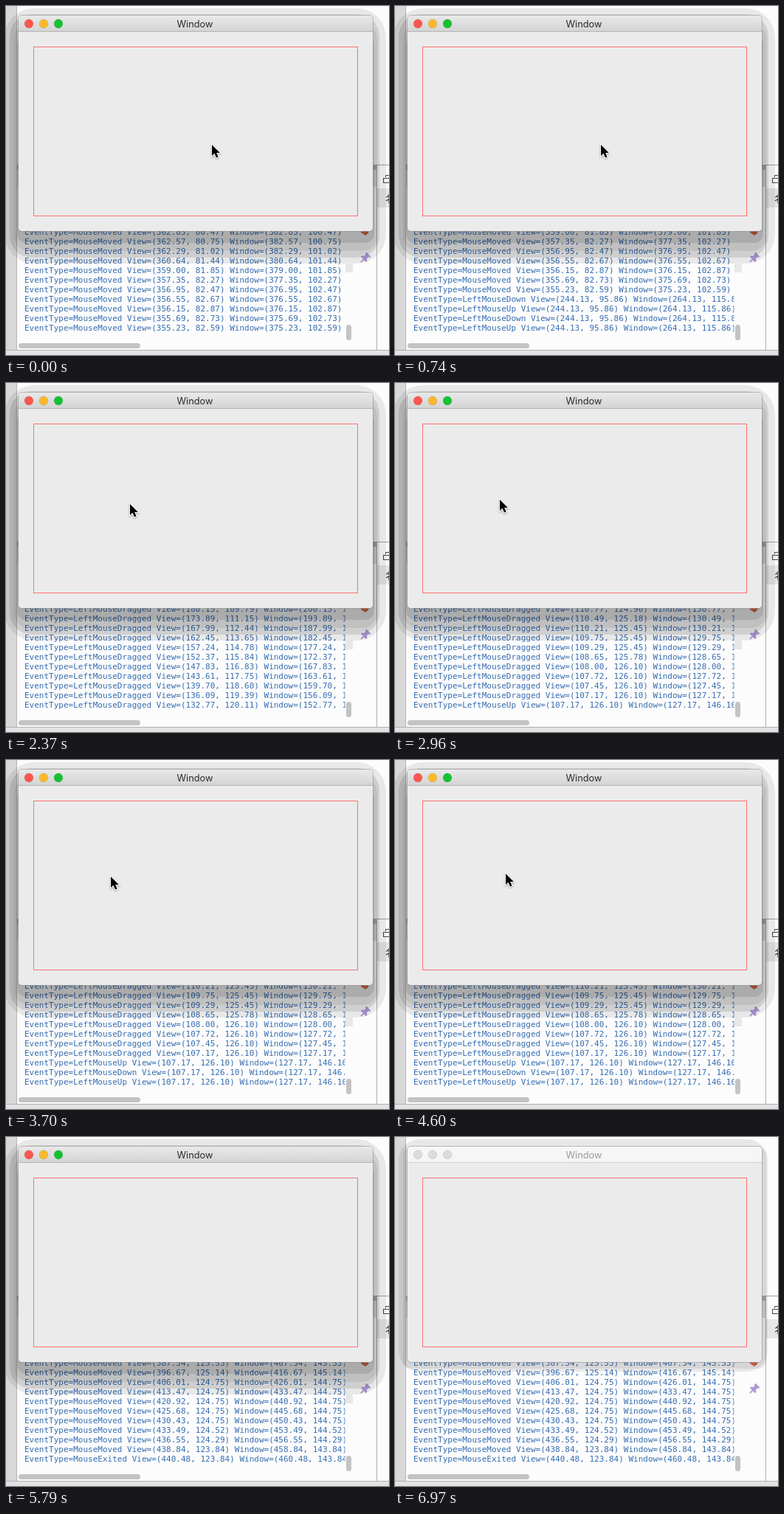
An HTML page for the animation above (7.07 s loop, 519 px wide and 473 px high).

```html
<!DOCTYPE html>
<html lang="en">
<head>
<meta charset="utf-8">
<title>Mouse events</title>
<style>
  html, body { margin: 0; width: 100%; height: 100%; overflow: hidden; background: #fcfcfc; }
  svg { display: block; }
  #log { font: 11px "DejaVu Sans Mono", monospace; fill: #366db1; }
  .title { font: 12.8px Inter, sans-serif; fill: #2b2b2b; text-anchor: middle; }
  .lights circle { stroke-width: .6; stroke: rgba(0, 0, 0, .18); }
  .lights :nth-child(1) { fill: #fc5650; }
  .lights :nth-child(2) { fill: #fdb92c; }
  .lights :nth-child(3) { fill: #14c231; }
  #arrow, #resize { stroke: #fff; paint-order: stroke; }
  #arrow { stroke-width: 2; filter: drop-shadow(0 1px 1px rgba(0, 0, 0, .35)); }
  .idle-shadow { display: none; }
  .idle .idle-shadow { display: inline; }
  .idle .active-shadow { display: none; }
  .idle .title { fill: #9a9a9a; }
  .idle .bar { fill: #f6f6f6; }
  .idle .rule { fill: #d3d3d3; }
  .idle .lights circle { fill: #dcdcdc; stroke: #c6c6c6; }
</style>
</head>
<body>
<svg id="stage" width="519" height="473" viewBox="0 0 519 473">
  <defs>
    <linearGradient id="barFill" x2="0" y2="1">
      <stop stop-color="#e9e9e9"/><stop offset="1" stop-color="#d3d3d3"/>
    </linearGradient>
    <clipPath id="logClip"><rect x="15" y="290" width="444.5" height="160"/></clipPath>
  </defs>

  <!-- editor behind the window -->
  <rect width="519" height="473" fill="#fcfcfc"/>
  <rect width="14" height="466" fill="#d8d8d8"/>
  <rect x="14" width="1" height="466" fill="#b5b5b5"/>
  <rect x="15" y="215" width="488" height="7" fill="#b0b0b0"/>
  <rect x="15" y="222" width="488" height="23" fill="#dedede"/>
  <rect x="502" y="215" width="1" height="251" fill="#b0b0b0"/>
  <rect x="503" y="215" width="16" height="1" fill="#a0a0a0"/>
  <rect x="503" y="247" width="16" height="26" fill="#e6e6e6"/>
  <g fill="none" stroke="#444">
    <rect x="511.5" y="233.5" width="10" height="6"/>
    <path d="M514.5 232V229.5H519"/>
  </g>
  <text x="514.5" y="266" font-size="12" font-family="Noto Sans CJK JP, Noto Sans CJK, sans-serif" fill="#222">名</text>
  <g id="log" clip-path="url(#logClip)"></g>
  <path d="M481 303H492L491 308L487 311L481 307Z" fill="#dd6b4c"/>
  <path transform="translate(486.5 341.5) rotate(45)" fill="#ab98d6"
        d="M-4-7H4V-4.5H2.5V-1L5 1V3H.8V8H-.8V3H-5V1L-2.5-1V-4.5H-4Z"/>
  <rect x="17" y="457" width="165" height="7" rx="3.5" fill="#c3c3c3"/>
  <rect x="461" y="432" width="7" height="21" rx="3.5" fill="#c3c3c3"/>
  <rect y="466" width="519" height="7" fill="#e3e3e3"/>
  <rect y="466" width="519" height="1" fill="#b0b0b0"/>

  <g class="active-shadow">
    <rect x="-2" y="3" width="517" height="346" rx="40" opacity=".08"/>
    <rect x="5" y="11" width="501" height="330" rx="30" opacity=".11"/>
    <rect x="11" y="24" width="492" height="308" rx="20" opacity=".07"/>
    <rect x="15" y="40" width="484" height="281" rx="12" opacity=".11"/>
    <rect x="460" y="349" width="10" height="12" opacity=".08"/>
  </g>
  <g class="idle-shadow">
    <rect x="5" y="3" width="500" height="315" rx="28" opacity=".08"/>
    <rect x="11" y="14" width="492" height="300" rx="10" opacity=".08"/>
  </g>

  <!-- window -->
  <rect x="16.5" y="12.5" width="481" height="293" rx="5" fill="#ebebeb" stroke="#000" stroke-opacity=".22"/>
  <path class="bar" d="M17 35V18Q17 13 22 13H492Q497 13 497 18V35Z" fill="url(#barFill)"/>
  <rect class="rule" x="17" y="34" width="480" height="1" fill="#b4b4b4"/>
  <g class="lights">
    <circle cx="31" cy="24" r="5.9"/><circle cx="51" cy="24" r="5.9"/><circle cx="71" cy="24" r="5.9"/>
  </g>
  <text class="title" x="256" y="28.6">Window</text>
  <rect x="37.5" y="55.5" width="439" height="229" fill="none" stroke="#ff7070"/>

  <path id="arrow" d="M0 0V15L3.5 11.8L6 17.6L8.6 16.5L6.2 10.9H11Z"/>
  <path id="resize" d="M487 165L491.5 160.8V164H498.5V160.8L503 165L498.5 169.2V166H491.5V169.2Z"/>
</svg>
<script>
const LOOP = 7070, IDLE_AT = 6970, EDGE_AT = 5640, CURSOR_GONE = 5790;
const ROWS = 11, TICKS = 8;
const byId = id => document.getElementById(id);

const log = [];    // printed events
const moves = [];  // pointer positions
const moveTo = (at, [x, y]) => moves.push({ at, x, y });

function emit(at, type, point) {
  log.push({ at, type, x: point[0], y: point[1] });
  moveTo(at, point);
}

// Points after `from` up to `to`, in n eased parts
const glide = (from, to, n, ease = p => p) => Array.from({ length: n }, (_, i) => {
  const p = ease((i + 1) / n);
  return from.map((v, axis) => v + (to[axis] - v) * p);
});

// Joins key points [x, y, parts] with straight glides
const route = (from, ...keys) => keys.flatMap(([x, y, n]) => {
  const points = glide(from, [x, y], n);
  from = [x, y];
  return points;
});

// Prints a stroke in equal bursts, from tick `first` to the last tick
function stroke(start, end, first, type, points, lastType, lastPoint) {
  const count = points.length + 1;
  const at = i => start + (end - start) * (first + Math.floor(i * (TICKS - first) / count)) / (TICKS - 1);
  points.forEach((point, i) => emit(at(i), type, point));
  emit(end, lastType, lastPoint);
}

function click(down, up, point) {
  emit(down, 'LeftMouseDown', point);
  emit(up, 'LeftMouseUp', point);
}

const ENTRY = [362.85, 80.47], PRESS = [244.13, 95.86], DROP = [107.17, 126.1];
const SLOWING = [110.77, 124.9], LEAVING = [387.34, 125.53], EXIT = [440.48, 123.84];

[ENTRY, ...route(ENTRY, [362.29, 81.02, 2], [357.35, 82.27, 3], [356.15, 82.87, 3], [355.23, 82.59, 2])]
  .forEach(point => emit(0, 'MouseMoved', point));
moveTo(0, PRESS);

click(150, 300, PRESS);
click(590, 740, PRESS);
click(1040, 1180, PRESS);
emit(1630, 'LeftMouseDown', PRESS);
stroke(1930, 2960, 0, 'LeftMouseDragged', [
  ...glide(PRESS, SLOWING, 36, p => 1 - (1 - p) ** 2.6),
  ...route(SLOWING, [110.21, 125.45, 2], [109.29, 125.45, 2], [108, 126.1, 2], [...DROP, 3])
], 'LeftMouseUp', DROP);
click(3400, 3700, DROP);

moveTo(4600, [115.2, 129.9]);
stroke(4600, EDGE_AT, 1, 'MouseMoved', [
  ...glide(DROP, LEAVING, 36, p => p ** 1.4),
  ...route(LEAVING, [406.01, 124.75, 2], [420.92, 124.75, 2], [430.43, 124.75, 2],
    [436.55, 124.29, 2], [438.84, 123.84, 1])
], 'MouseExited', EXIT);

const rows = Array.from({ length: ROWS }, (_, i) => {
  const row = document.createElementNS('http://www.w3.org/2000/svg', 'text');
  row.setAttribute('x', 25);
  row.setAttribute('y', 310 + 13 * i);
  return byId('log').appendChild(row);
});

const pair = (x, y) => `(${x.toFixed(2)}, ${y.toFixed(2)})`;
const describe = ({ type, x, y }) =>
  `EventType=${type} View=${pair(x, y)} Window=${pair(x + 20, y + 20)}`;
const show = (id, visible) => { byId(id).style.display = visible ? '' : 'none'; };

function render(time) {
  const past = item => item.at <= time;
  const visible = log.filter(past).slice(-ROWS);
  const { x, y } = moves.filter(past).pop();

  rows.forEach((row, i) => {
    const line = describe(visible[i]);
    if (row.textContent !== line) row.textContent = line;
  });
  byId('arrow').setAttribute('transform', `translate(${Math.round(x + 34.9)} ${Math.round(283.8 - y)})`);
  show('arrow', time < EDGE_AT);
  show('resize', time >= EDGE_AT && time < CURSOR_GONE);
  byId('stage').classList.toggle('idle', time >= IDLE_AT);
}

const begin = performance.now();
function tick() {
  render((performance.now() - begin) % LOOP);
  requestAnimationFrame(tick);
}
tick();
</script>
</body>
</html>
```
